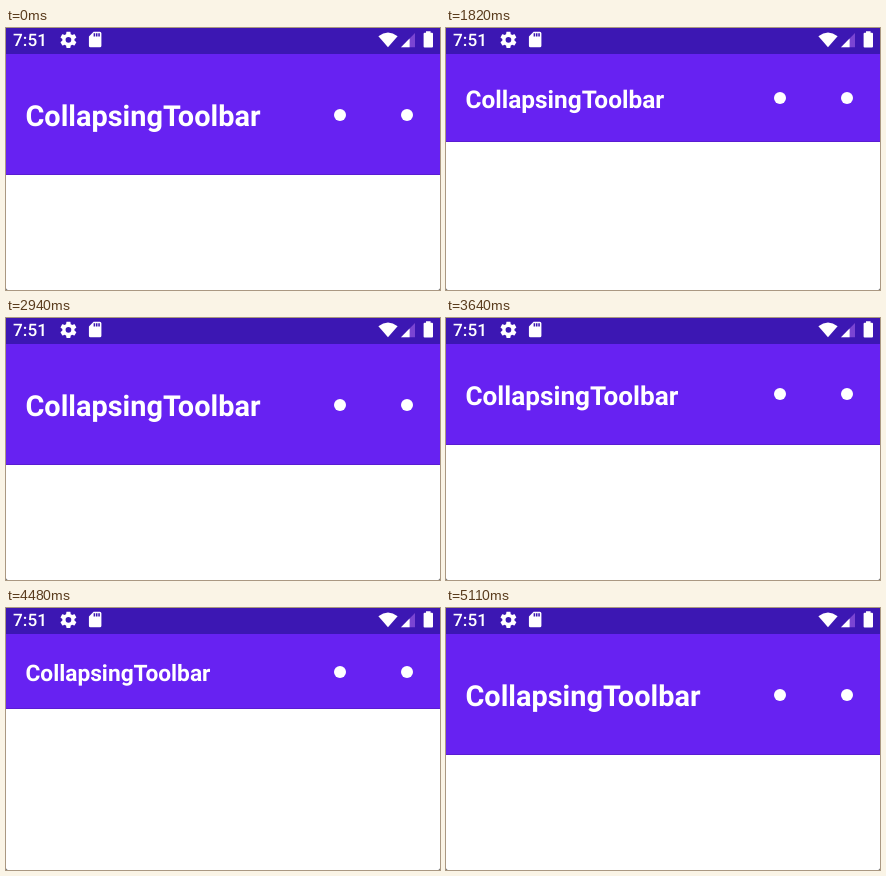
These frames come from a looping animation (434x262 px, 5180 ms). An HTML page:

```html
<!DOCTYPE html>
<html lang="en">
<head>
<meta charset="utf-8">
<title>Collapsing toolbar</title>
<style>
  /* 0 = expanded, 1 = collapsed */
  @property --fold {
    syntax: "<number>";
    inherits: true;
    initial-value: 0;
  }

  html, body {
    margin: 0;
    width: 100%;
    height: 100%;
    overflow: hidden;
    background: #444;
  }

  .stage {
    position: relative;
    width: 434px;
    height: 262px;
    overflow: hidden;
    background: #fff;
    border-radius: 0 0 2px 2px;
    font-family: Roboto, sans-serif;
    color: #fff;
    text-rendering: geometricPrecision;
    animation: fold 5180ms -1ms infinite;
  }

  .toolbar {
    position: absolute;
    top: 26px;
    left: 0;
    width: 100%;
    height: calc(121px - 60.2px * var(--fold));
    background: #6722f2;
    box-shadow: inset 0 -1px #5a1cd2;
  }

  .title {
    position: absolute;
    left: 19.4px;
    top: calc(50% + 2.3px - .5px * var(--fold));
    margin: 0;
    height: 0;
    line-height: 0;
    white-space: nowrap;
    font-weight: 700;
    font-size: calc(28.9px - 8.1px * var(--fold));
  }

  .action {
    position: absolute;
    top: calc(50% - 6px);
    width: 12px;
    height: 12px;
    border-radius: 50%;
    background: #fff;
  }
  .action.first { left: 327.5px; }
  .action.second { left: 395px; }

  .status {
    position: absolute;
    top: 0;
    left: 0;
    background: #3c17b3;
    fill: #fff;
  }

  /* The picture advances every 70 ms, 74 times per loop */
  @keyframes fold {
    0%       { --fold: 0;    animation-timing-function: step-end; }
    29.7297% { --fold: .005; animation-timing-function: steps(2); }
    32.4324% { --fold: .22;  animation-timing-function: steps(2); }
    35.1351% { --fold: .55;  animation-timing-function: steps(2); }
    37.8378% { --fold: 1;    animation-timing-function: step-end; }

    45.9459% { --fold: 1;    animation-timing-function: steps(3); }
    50%      { --fold: .8;   animation-timing-function: steps(5); }
    56.7568% { --fold: 0;    animation-timing-function: step-end; }

    64.8649% { --fold: 0;    animation-timing-function: steps(2); }
    67.5676% { --fold: .13;  animation-timing-function: steps(2); }
    70.2703% { --fold: .335; animation-timing-function: steps(4); }
    75.6757% { --fold: 1;    animation-timing-function: step-end; }

    82.4324% { --fold: 1;    animation-timing-function: steps(3); }
    86.4865% { --fold: .76;  animation-timing-function: steps(5); }
    93.2432% { --fold: .37;  animation-timing-function: steps(4); }
    98.6486%, 100% { --fold: 0; }
  }
</style>
</head>
<body>
<div class="stage">
  <div class="toolbar">
    <h1 class="title">CollapsingToolbar</h1>
    <i class="action first"></i>
    <i class="action second"></i>
  </div>

  <svg class="status" width="434" height="26" viewBox="0 0 434 26">
    <text x="7.1" y="18.4" font-size="17.2" font-weight="500">7:51</text>
    <!-- settings -->
    <path transform="translate(52.7 2.1) scale(.81)" d="M19.43 12.98c.04-.32.07-.64.07-.98s-.03-.66-.07-.98l2.11-1.65c.19-.15.24-.42.12-.64l-2-3.46c-.12-.22-.39-.3-.61-.22l-2.49 1c-.52-.4-1.08-.73-1.69-.98l-.38-2.65C14.46 2.18 14.25 2 14 2h-4c-.25 0-.46.18-.49.42l-.38 2.65c-.61.25-1.17.59-1.69.98l-2.49-1c-.23-.09-.49 0-.61.22l-2 3.46c-.13.22-.07.49.12.64l2.11 1.65c-.04.32-.07.65-.07.98s.03.66.07.98l-2.11 1.65c-.19.15-.24.42-.12.64l2 3.46c.12.22.39.3.61.22l2.49-1c.52.4 1.08.73 1.69.98l.38 2.65c.03.24.24.42.49.42h4c.25 0 .46-.18.49-.42l.38-2.65c.61-.25 1.17-.59 1.69-.98l2.49 1c.23.09.49 0 .61-.22l2-3.46c.12-.22.07-.49-.12-.64zM12 15.5a3.5 3.5 0 1 1 0-7 3.5 3.5 0 0 1 0 7z"/>
    <!-- memory card -->
    <path transform="translate(79.8 2.2) scale(.78)" d="M18 2h-8L4 8v12a2 2 0 0 0 2 2h12a2 2 0 0 0 2-2V4a2 2 0 0 0-2-2zM12 8h-2V4h2zM15 8h-2V4h2zM18 8h-2V4h2z"/>
    <!-- wifi, signal, battery -->
    <path d="M372.4 8.2Q382 .8 391.6 8.2L382 19.2z"/>
    <path d="M395 19.2L409 5V19.2z" fill="#7a45d2"/>
    <path d="M395 19.2L403.6 10.5V19.2z"/>
    <path d="M420 4.8V3.3h4.6v1.5h1.4q1 0 1 1V18.4q0 1-1 1h-7.4q-1 0-1-1V5.8q0-1 1-1z"/>
  </svg>
</div>
</body>
</html>
```
